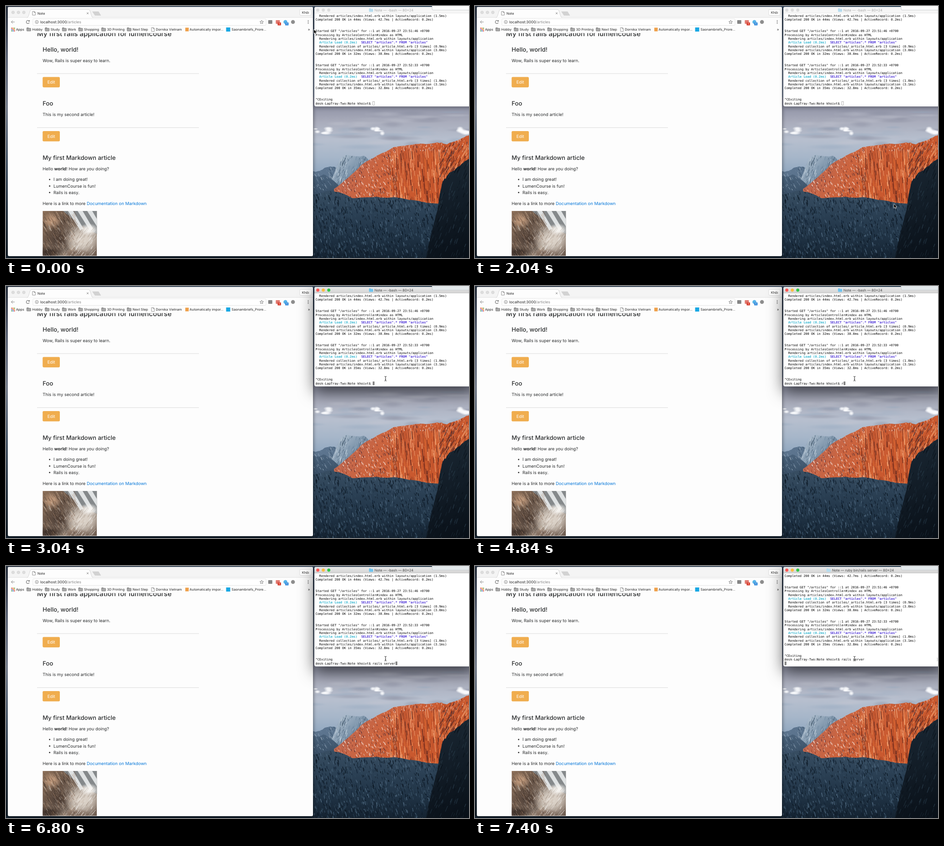
An HTML page with a canvas that plays this animation: 1015x552 px, repeating every 8000 ms.

```html
<!DOCTYPE html>
<html lang="en">
<head>
<meta charset="utf-8">
<title>Rails server</title>
<style>
html, body { margin: 0; width: 100%; height: 100%; overflow: hidden; background: #16222e; }
canvas, svg { position: absolute; left: 0; top: 0; width: 1015px; height: 552px; display: block; }
text { font-family: Inter, Roboto, sans-serif; text-rendering: geometricPrecision; }
.mono { font-family: "DejaVu Sans Mono", "Liberation Mono", monospace; font-size: 6.93px; }
.beam { fill: none; }
</style>
</head>
<body>
<canvas id="stage" width="1015" height="552"></canvas>
<svg viewBox="0 0 1015 552">
  <defs>
    <clipPath id="page"><rect x="4" y="59.5" width="669" height="488"/></clipPath>
    <path id="bar" d="M-2.4 -5Q0 -5 0 -3.6Q0 -5 2.4 -5M0 -4V4M-2.4 5Q0 5 0 3.6Q0 5 2.4 5M-1.2 1.4H1.2"/>
  </defs>
  <g id="labels"></g>
  <g id="content" clip-path="url(#page)"></g>
  <g id="term"></g>
  <path id="arrow" d="M0 0V9.6L2.2 7.6L3.7 11L5.3 10.3L3.9 7H6.8Z" fill="#000" stroke="#fff" stroke-width=".7"/>
  <g id="beam" class="beam">
    <use href="#bar" stroke="#fff" stroke-width="2"/>
    <use href="#bar" stroke="#222" stroke-width=".9"/>
  </g>
</svg>
<script>
const W = 1015, H = 552, LOOP = 8000;
const $ = id => document.getElementById(id);
const view = $('stage').getContext('2d');
const base = document.createElement('canvas');
base.width = W; base.height = H;
let c = base.getContext('2d');

let seed = 7;
const rnd = (a = 0, b = 1) => {
  seed = (seed * 16807) % 2147483647;
  return a + (b - a) * seed / 2147483647;
};
const pick = list => list[Math.floor(rnd(0, list.length))];

// Canvas shapes
function box(x, y, w, h, fill, r = 0, stroke) {
  c.beginPath();
  c.roundRect(x, y, w, h, r);
  if (fill) { c.fillStyle = fill; c.fill(); }
  if (stroke) { c.strokeStyle = stroke; c.lineWidth = 0.7; c.stroke(); }
}
function dot(x, y, r, fill, stroke) {
  c.beginPath();
  c.arc(x, y, r, 0, 7);
  if (fill) { c.fillStyle = fill; c.fill(); }
  if (stroke) { c.strokeStyle = stroke; c.lineWidth = 0.8; c.stroke(); }
}
function trace(pts) {
  c.beginPath();
  for (const [x, y] of pts) c.lineTo(x, y);
}
function poly(pts, fill) {
  trace(pts);
  c.fillStyle = fill; c.fill();
}
function line(pts, color, width = 1) {
  trace(pts);
  c.strokeStyle = color; c.lineWidth = width; c.stroke();
}
function fade(x0, y0, x1, y1, ...stops) {
  const g = c.createLinearGradient(x0, y0, x1, y1);
  stops.forEach((s, i) => g.addColorStop(i / (stops.length - 1), s));
  return g;
}
function puff(x, y, rx, ry, color) {
  c.save();
  c.translate(x, y); c.scale(rx, ry);
  const g = c.createRadialGradient(0, 0, 0, 0, 0, 1);
  g.addColorStop(0, color); g.addColorStop(0.3, color); g.addColorStop(1, color.slice(0, 7) + '00');
  c.fillStyle = g; c.fillRect(-1, -1, 2, 2);
  c.restore();
}
// Splits each edge repeatedly, shifting the midpoints
function ridge(pts, rough) {
  for (let pass = 0; pass < 4; pass++, rough /= 2)
    pts = pts.flatMap((p, i) => i ? [[(pts[i - 1][0] + p[0]) / 2, (pts[i - 1][1] + p[1]) / 2 + rnd(-rough, rough)], p] : [p]);
  return pts;
}
// Fine slanted marks inside a shape
function grain(shape, n, [x0, y0, x1, y1], len, colors, slant = 0, width = 1) {
  c.save();
  trace(shape); c.clip();
  for (let i = 0; i < n; i++) {
    const x = rnd(x0, x1), y = rnd(y0, y1), l = rnd(len * 0.3, len);
    line([[x, y], [x + l * slant + rnd(-1, 1), y + l]], pick(colors), rnd(0.4, width));
  }
  c.restore();
}
// A mountain: rough skyline, filled down to a floor
function mountain(skyline, rough, floor, fill) {
  const shape = [...ridge(skyline, rough), [skyline.at(-1)[0], floor], [skyline[0][0], floor]];
  poly(shape, fill);
  return shape;
}

function wallpaper() {
  box(0, 0, W, H, fade(0, 0, 0, H, '#2b3b50', '#6f7d92', '#8f9ab0', '#43566b', '#101c28'));
  box(673, 200, 342, 220, fade(0, 215, 0, 370, '#8d90a3', '#a9acbb', '#b7bfce', '#a6b6c9', '#8fa6bf'));
  for (let i = 0; i < 40; i++)
    puff(rnd(673, W), rnd(222, 310), rnd(20, 55), rnd(3, 9), pick(['#85899c55', '#c2c5d055', '#93a7be55']));
  for (const x of [692, 815, 1000])
    for (let i = 0; i < 7; i++) puff(x + rnd(-16, 16), 273 + rnd(-5, 6), rnd(5, 13), rnd(2, 6), '#fbfcfedd');

  const snow = ['#d6e0e8', '#4b6279', '#8fa5b9', '#30465b', '#6c859d'];
  const far = mountain([[673, 362], [708, 352], [760, 355], [W, 350]], 6, 430, '#5c748e');
  grain(far, 260, [673, 345, 800, 420], 9, snow, 0.5);
  const dome = mountain([[712, 385], [734, 333], [748, 326], [785, 328], [806, 352]], 3, 410,
    fade(725, 330, 795, 400, '#b3c2d0', '#7890a7', '#465d73'));
  grain(dome, 340, [712, 326, 806, 410], 11, snow, -0.3);
  const slope = mountain([[673, 372], [700, 370], [745, 408], [800, 420]], 5, 470, fade(0, 370, 0, 460, '#4a627b', '#263a4d'));
  grain(slope, 300, [673, 370, 800, 460], 8, snow, 0.6);

  const cliff = mountain([[719, 401], [777, 350], [850, 309], [945, 299], [967, 303], [W, 283]], 4, 435,
    fade(740, 300, 900, 400, '#b5685a', '#cb643f', '#c9592f'));
  const lit = ['#e98a56', '#b94c27', '#83341f', '#f0a274', '#d9652f', '#642c22'];
  const frosted = ['#efcfc0', '#8a3d2e', '#53323a', '#dc7a50', '#f6e4dc'];
  grain(cliff, 700, [719, 300, 858, 425], 6, frosted, 0.4, 1.4);
  grain(cliff, 480, [840, 312, 985, 430], 28, lit, 0.08, 1.7);
  grain(cliff, 330, [820, 284, W, 316], 6, frosted, 0, 1.2);
  grain(cliff, 200, [955, 298, W, 365], 14, [...lit, '#51343a'], -0.5, 1.6);

  const wood = mountain([[673, 412], [710, 404], [760, 421], [860, 420], [950, 433], [W, 420]], 4, H,
    fade(0, 410, 0, H, '#374d61', '#2a3f53', '#203345', '#142230'));
  const pines = ['#4a6379', '#0d1824', '#2e4559', '#0f1d2a', '#3d566b', '#16273a'];
  grain(wood, 1500, [673, 405, 965, H], 9, pines, 0.25, 1.7);
  const rock = mountain([[920, H], [945, 450], [957, 385], [972, 365], [W, 335]], 8, H,
    fade(930, 350, W, H, '#1a2733', '#111b25', '#080f17'));
  grain(rock, 240, [915, 335, W, H], 14, ['#263846', '#0a121a', '#1b2a36'], -0.4, 1.4);

  box(0, 0, 4, H, fade(0, 0, 0, H, '#26303f', '#69748a', '#8c96a8', '#56687d', '#2a3b4c', '#0d1822'));
  box(0, 547, 673, 5, '#132230');
  box(0, 0, W, 2, fade(0, 0, W, 0, '#26303f', '#3d4d60', '#48586c', '#28445a'));
}

// SVG text
const ruler = document.createElement('canvas').getContext('2d');
ruler.font = '100px Inter, Roboto, sans-serif';
const textWidth = (s, size) => ruler.measureText(s).width * size / 100;

function make(parent, tag, attrs, str = '') {
  const el = document.createElementNS('http://www.w3.org/2000/svg', tag);
  for (const k in attrs) el.setAttribute(k, attrs[k]);
  el.textContent = str;
  parent.append(el);
  return el;
}
const label = (g, x, y, size, str, fill = '#292b2c', extra = {}) =>
  make(g, 'text', { x, y, 'font-size': size, fill, ...extra }, str);
const span = (t, str, attrs = {}) => make(t, 'tspan', attrs, str);
const MID = { 'text-anchor': 'middle' }, SEMI = { 'font-weight': 500 };

function folder(x, y, fill, stroke) {
  box(x, y, 4, 4, fill, 0.8, stroke);
  box(x, y + 1.3, 9, 6.1, fill, 0.8, stroke);
}
function sheet(x, y) {
  box(x, y, 6.3, 8, '#fff', [0, 2.5, 0, 0], '#666');
  line([[x + 3.8, y], [x + 3.8, y + 2.5], [x + 6.3, y + 2.5]], '#666', 0.7);
}

function tabBar() {
  const g = $('labels');
  c.save();
  c.shadowColor = '#0008'; c.shadowBlur = 9; c.shadowOffsetY = 3;
  box(4, 2, 669, 546, '#fdfdfd', 3);
  c.restore();
  box(4, 2, 669, 23, '#f4f4f4', [3, 3, 0, 0]);
  line([[4, 25], [673, 25]], '#d4d4d4', 0.7);
  for (let i = 0; i < 3; i++) dot(15.5 + i * 11.8, 14, 3.1, '#dedede', '#d0d0d0');
  c.beginPath();
  c.moveTo(46, 25.5);
  c.bezierCurveTo(51, 25, 51, 7.5, 56, 7.5);
  c.lineTo(181, 7.5);
  c.bezierCurveTo(186, 7.5, 186, 25, 191, 25.5);
  c.fillStyle = '#fdfdfd'; c.fill();
  c.strokeStyle = '#c8c8c8'; c.lineWidth = 0.7; c.stroke();
  poly([[189, 12], [203, 12], [208.5, 21], [195, 21]], '#d2d2d2');
  sheet(58, 12);
  for (const s of [-2, 2]) line([[179 - s, 14], [179 + s, 18]], '#777', 0.8);
  box(644, 7.5, 25, 13, '#fff', 2, '#d0d0d0');
  label(g, 69, 18.6, 7.3, 'Note', '#222');
  label(g, 656.5, 16.7, 7.4, 'Khôi', '#222', MID);
}

function addressBar() {
  const g = $('labels');
  line([[19, 35], [11.5, 35]], '#888');
  line([[15, 31.5], [11.5, 35], [15, 38.5]], '#888');
  c.beginPath(); c.arc(48, 35, 3.4, 0.4, 5.6);
  c.strokeStyle = '#707070'; c.lineWidth = 1.1; c.stroke();
  poly([[48.6, 33.9], [52, 33.9], [52, 30.6]], '#707070');
  box(59, 28, 511, 14.5, '#fff', 2, '#dcdcdc');
  dot(67.5, 35, 3.4, null, '#666');
  line([[67.5, 34.4], [67.5, 37]], '#666', 0.9);
  line([[67.5, 32.9], [67.5, 33.7]], '#666', 0.9);
  const star = Array.from({ length: 11 }, (_, i) => {
    const r = i % 2 ? 1.8 : 4.2, a = i * Math.PI / 5 - Math.PI / 2;
    return [560.5 + r * Math.cos(a), 35.3 + r * Math.sin(a)];
  });
  line(star, '#666', 0.8);
  const url = label(g, 75, 38, 8.26, '', '#222');
  span(url, 'localhost:3000');
  span(url, '/articles', { fill: '#808080' });

  const badges = [, '#d8402f', '#3c8fdd'];
  ['#858585', '#e07a70', '#58b3e8', '#8e8e8e'].forEach((fill, i) => {
    const x = 579.3 + i * 16.6;
    if (i < 2) box(x - 4.5, 31, 9, 8, fill, 1); else dot(x, 35, 4.3, fill);
    if (!badges[i]) return;
    box(x - 0.5, 36, 7.5, 6.5, badges[i], 1);
    label(g, x + 3.2, 41.3, 5.4, '1', '#fff', MID);
  });
  for (let i = -1; i < 2; i++) dot(662.5, 35 + i * 3, 0.9, '#666');
}

function bookmarks() {
  const g = $('labels'), size = 7.3, tints = ['#e0483a', '#f08c2e', '#58a64c', '#3b7de0'];
  for (let i = 0; i < 9; i++) box(11.5 + i % 3 * 3, 47.5 + Math.floor(i / 3) * 3, 2.2, 2.2, tints[i % 4]);
  label(g, 22, 54, size, 'Apps', '#222');
  let x = 45.5;
  const add = (name, gap, icon) => {
    icon(x);
    label(g, x + gap, 54, size, name, '#222');
    x += gap + textWidth(name, size) + 5.6;
  };
  for (const name of ['Hobby', 'Study', 'Work', 'Shopping', '3D Printing', 'Next Step'])
    add(name, 12, x => folder(x, 47.5, '#a9a9a9', '#737373'));
  x += 2;
  add('Dornika Vietnam', 9.5, x => sheet(x, 47.5));
  x += 2;
  add('Automatically impor...', 9.5, x => box(x, 47.5, 7.5, 8, '#efa04a'));
  add('Saonambriefs_Prore...', 12, x => box(x, 47, 9, 9, '#19a8e4'));
  label(g, 662, 54, size, '»', '#222');
}

function page() {
  const p = $('content'), left = 80.3, size = 9.45, step = 118.4;
  const heading = (y, s) => label(p, left, y, 13.1, s, undefined, SEMI);
  label(p, 68, 66.1, 15.1, 'My first rails application for lumencourse', undefined, SEMI);
  [['Hello, world!', 'Wow, Rails is super easy to learn.'], ['Foo', 'This is my second article!']].forEach(([head, body], i) => {
    const y = i * step;
    heading(100 + y, head);
    label(p, left, 122.6 + y, size, body);
    line([[68, 148 + y], [423, 148 + y]], '#d9d9d9', 0.9);
    box(left, 155.5 + y, 37.7, 22.7, '#f0ad4e', 2.4);
    label(p, left + 18.9, 170.3 + y, size, 'Edit', '#fff', MID);
  });
  heading(100 + 2 * step, 'My first Markdown article');
  const hello = label(p, left, 359.6, size, '');
  span(hello, 'Hello ');
  span(hello, 'world', { 'font-weight': 700 });
  span(hello, '! How are ');
  span(hello, 'you', { 'font-style': 'italic' });
  span(hello, ' doing?');
  ['I am doing great!', 'LumenCourse is fun!', 'Rails is easy.'].forEach((s, i) => {
    dot(95.7, 380 + i * 14.25, 1.5, '#333');
    label(p, 104, 383.4 + i * 14.25, size, s);
  });
  const link = label(p, left, 435.9, size, '');
  span(link, 'Here is a link to more ');
  span(link, 'Documentation on Markdown', { fill: '#0275d8' });
}

function photo() {
  const x = 80.3, y = 449, w = 119, h = 98.5;
  const frame = [[x, y], [x + w, y], [x + w, y + h], [x, y + h]];
  c.save();
  trace(frame); c.clip();
  box(x, y, w, h, fade(x, y, x + w, y + h, '#8d7059', '#665346', '#a3968a', '#6d5a4d'));
  poly([[125, 449], [200, 449], [200, 500], [160, 478]], '#85898b');
  for (let i = 0; i < 3; i++) {
    const s = 136 + i * 21;
    poly([[s, 449], [s + 11, 449], [s + 34, 488], [s + 27, 492]], '#dfe2e3');
  }
  puff(100, 470, 22, 18, '#c8a081cc');
  puff(118, 512, 30, 34, '#4a3a31cc');
  puff(168, 512, 42, 34, '#ded5cbee');
  puff(182, 490, 22, 14, '#f8f6f3ee');
  puff(95, 540, 34, 14, '#3d3029dd');
  puff(150, 543, 34, 12, '#80695acc');
  grain(frame, 300, [x, y, x + 70, y + h], 12, ['#2e252088', '#c9ad9377', '#7d5d4788', '#e8dccf77'], 0.6, 1.3);
  grain(frame, 130, [x + 50, y + 35, x + w, y + h], 12, ['#ffffff88', '#8c7b6d77', '#cbbcae88'], -0.7, 1.2);
  c.restore();
}

// Terminal
const COL = 4.172, ROW = 8.33, LEFT = 678.5, TOP = 24.1;
const PROMPT = 'desk-LapTray-Two:Note khoivt$';
const TITLES = ['-bash', 'ruby ~/.rvm/gems/ruby-2.3.0/bin/rails server', 'ruby bin/rails server'];
const request = (time, all, list, total, views) => [
  `Started GET "/articles" for ::1 at 2016-09-27 ${time} +0700`,
  'Processing by ArticlesController#index as HTML',
  '  Rendering articles/index.html.erb within layouts/application',
  '@',
  `  Rendered collection of articles/_article.html.erb [3 times] (${list}ms)`,
  `  Rendered articles/index.html.erb within layouts/application (${all}ms)`,
  `Completed 200 OK in ${total}ms (Views: ${views}ms | ActiveRecord: 0.2ms)`, '', ''];
const log = [
  ...request('23:51:02', '1.5', '0.9', 44, '42.7').slice(5),
  ...request('23:51:46', '3.0', '0.9', 32, '30.0'),
  ...request('23:52:33', '3.1', '1.0', 35, '32.8'),
  '^CExiting'];

function terminalWindow(active, running) {
  c.save();
  c.shadowColor = active ? 'rgba(0,0,0,.6)' : 'rgba(0,0,0,.3)';
  c.shadowBlur = active ? 34 : 9;
  c.shadowOffsetY = active ? 12 : 3;
  box(676, 2, 350, 218, '#fff', 4);
  c.restore();
  box(676, 2, 350, 13.5, active ? fade(0, 2, 0, 15, '#ebebeb', '#d3d3d3') : '#f6f6f6', [4, 4, 0, 0]);
  line([[676, 15.5], [W, 15.5]], active ? '#b5b5b5' : '#dcdcdc', 0.6);
  ['#fc5753', '#fdbc40', '#33c748'].forEach((f, i) => dot(683.6 + i * 12, 9, 3.4, active ? f : '#dcdcdc'));
  const title = `Note — ${TITLES[running]} — 80×24`, size = 7.55;
  const x = 844.5 - (12 + textWidth(title, size)) / 2;
  folder(x, 5.3, active && !running ? '#6fc3ee' : '#b5dcee');
  label($('term'), x + 12, 11.7, size, title, active ? '#444' : '#a5a5a5');
  box(934, -6, 90, 15, active ? '#e3e9ec' : '#fbfbfb', 3, '#b9bdc0');
}

function cell(col, row, str, fill = '#000', weight = 400) {
  make($('term'), 'text', { class: 'mono', x: LEFT + col * COL, y: TOP + row * ROW, fill, 'font-weight': weight }, str);
}
function terminalText(active, typed, running) {
  const rows = [...log, (PROMPT + ' ' + typed).trim()];
  if (running) { rows.shift(); rows.push(''); }
  rows.forEach((s, i) => {
    if (s === '@') {
      cell(2, i, 'Article Load (0.2ms)', '#2fb4cf', 700);
      cell(24, i, 'SELECT "articles".* FROM "articles"', '#4a2fd6', 700);
    } else if (s) cell(s.search(/\S/), i, s.trim());
  });
  const col = running ? 0 : PROMPT.length + 1 + typed.length;
  const look = active ? { fill: '#858585' } : { fill: 'none', stroke: '#999', 'stroke-width': 0.7 };
  make($('term'), 'rect', { x: LEFT + col * COL + 0.2, y: 209.2, width: 4, height: 8, ...look });
  if (running)
    make($('term'), 'path', { d: 'M678.5 201.5H677.3V208H678.5M1012.5 201.5H1013.6V208H1012.5', fill: 'none', stroke: '#aaa', 'stroke-width': 0.6 });
}

// Motion
const KEY_GAP = 150;
const bursts = [[4840, 'r|ai'], [5320, 'l|s| |s'], [6060, 'e|r|v'], [6650, 'e|r']];
const typedAt = t => bursts.map(([start, keys]) =>
  keys.split('|').filter((_, i) => t >= start + i * KEY_GAP).join('')).join('');

// Curve from a to b bent toward m, taken in n jumps
function glide(t, start, gap, n, a, m, b) {
  const u = Math.min(1, (Math.floor((t - start) / gap) + 1) / n), v = 1 - u;
  return a.map((p, i) => v * v * p + 2 * u * v * m[i] + u * u * b[i]);
}
const side = [674.8, 51], top1 = [773.8, 63.5], low = [946.5, 525.5], rest = [832, 203];
function pointerAt(t) {
  if (t < 530) return side;
  if (t < 830) return top1;
  if (t < 2040) return glide(t, 830, 145, 7, top1, [821, 159], low);
  return glide(t, 2040, 166, 6, low, [856, 225], rest);
}

let last = '';
function draw(now) {
  const t = now % LOOP;
  const active = t >= 3040, running = (t >= 7100) + (t >= 7400), typed = typedAt(t);
  const state = [active, running, typed].join();
  if (state !== last) {
    last = state;
    c = view;
    c.drawImage(base, 0, 0);
    $('term').replaceChildren();
    terminalWindow(active, running);
    terminalText(active, typed, running);
  }
  const beam = t >= 2870;
  $('arrow').setAttribute('visibility', beam ? 'hidden' : 'visible');
  $('beam').setAttribute('visibility', beam ? 'visible' : 'hidden');
  $(beam ? 'beam' : 'arrow').setAttribute('transform', `translate(${pointerAt(t)})`);
}

for (const paint of [wallpaper, tabBar, addressBar, bookmarks, page, photo]) paint();
const start = performance.now();
function tick() {
  draw(performance.now() - start);
  requestAnimationFrame(tick);
}
tick();
</script>
</body>
</html>
```
